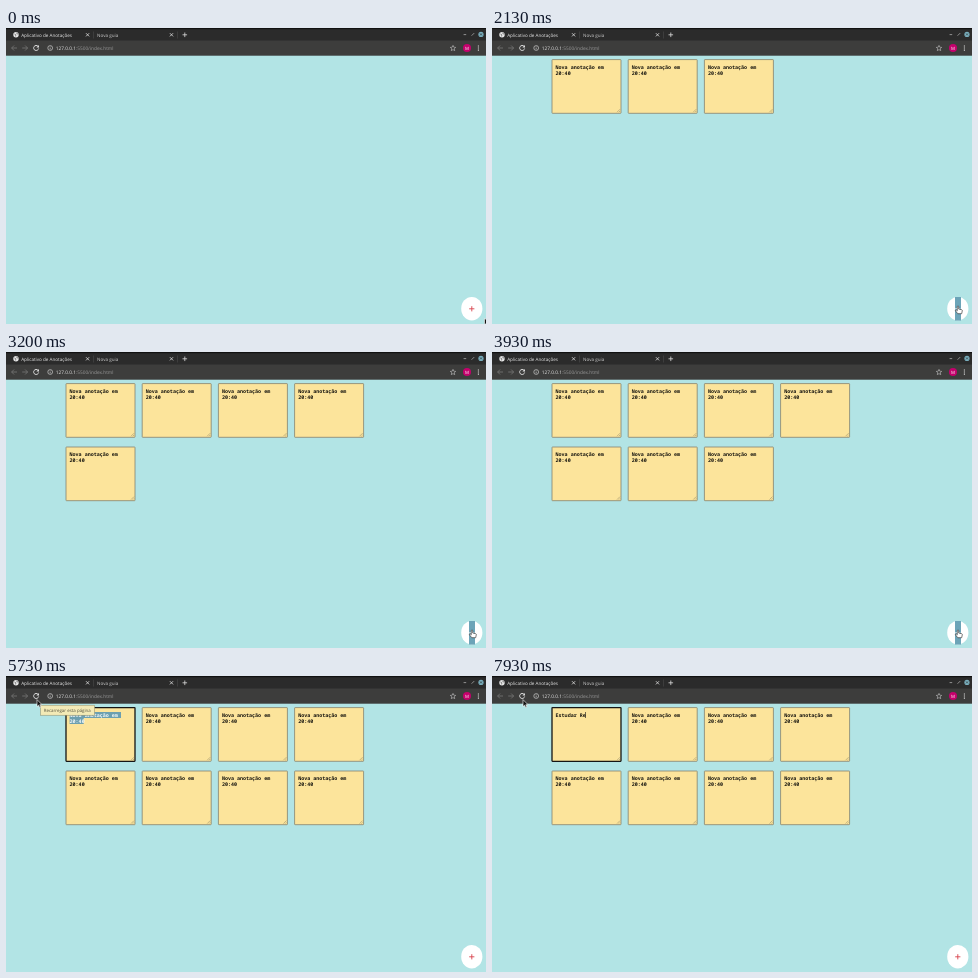
Recreate the animation shown at these times as an HTML page. Size 480 px wide and 296 px high, loop 8 s.

```html
<!DOCTYPE html>
<html lang="pt">
<head>
<meta charset="utf-8">
<title>Aplicativo de Anotações</title>
<style>
  html, body { margin: 0; width: 100%; height: 100%; overflow: hidden; background: #b2e4e5; }
  svg { display: block; width: 480px; height: 296px; }
  text { font: 4.6px "Open Sans", "Noto Sans", sans-serif; fill: #e8e8e8; text-rendering: geometricPrecision; }
  .line { fill: none; stroke: #ddd; stroke-width: .8; }
  .dim { stroke: #777; }
  .note text { font: bold 5.03px "Noto Sans Mono", "DejaVu Sans Mono", monospace; fill: #17150f; }
  .note .sheet { fill: #fce49b; stroke: #85826f; stroke-width: .8; }
  .note .grip { fill: none; stroke: #8d8566; stroke-width: .5; }
</style>
</head>
<body>
<svg viewBox="0 0 480 296">
  <rect width="480" height="296" fill="#b2e4e5"/>

  <!-- browser bars -->
  <rect width="480" height="13" fill="#2b2b2b"/>
  <rect width="480" height="1.2" fill="#111"/>
  <rect y="12.5" width="480" height="15.2" fill="#3d3d3c"/>
  <path d="M87.5 3.5v7M171.5 3.5v7" class="line" style="stroke:#4a4a4a;stroke-width:.6"/>
  <circle cx="10" cy="6.8" r="2.7" fill="#e6e6e6"/>
  <path d="M8.4 6l1.5.8-.4 1.6M10.4 4.6l.6 1.2 1.2.2" class="line" style="stroke:#444;stroke-width:.6"/>
  <text x="15.2" y="8.5">Aplicativo de Anotações</text>
  <text x="91" y="8.5" style="fill:#ccc">Nova guia</text>
  <path d="M80 5.2l3.2 3.2m0-3.2l-3.2 3.2M163.9 5.2l3.2 3.2m0-3.2l-3.2 3.2M176.5 6.8h4.6M178.8 4.5v4.6" class="line"/>
  <path d="M457.6 6.6h2.6M465.6 7.7l2.6-2.6" class="line" style="stroke:#aaa"/>
  <circle cx="475" cy="6.4" r="2.6" fill="#78aebd"/>
  <path d="M474 5.4l2 2m0-2l-2 2" class="line" style="stroke:#2b2b2b;stroke-width:.6"/>
  <path d="M11 20H5.6m2.5-2.5L5.6 20l2.5 2.5M16.2 20h5.4m-2.5-2.5l2.5 2.5-2.5 2.5" class="line dim"/>
  <path d="M32 18.3a2.5 2.5 0 1 0 .6 2.2" class="line" style="stroke-width:1"/>
  <path d="M33 17v2.6h-2.6z" fill="#ddd"/>
  <circle cx="44.2" cy="20" r="2.4" class="line" style="stroke-width:.6"/>
  <path d="M44.2 18.6v.6m0 .5v1.7" class="line" style="stroke-width:.6"/>
  <text x="49.8" y="21.8" style="font-size:4.78px">127.0.0.1<tspan fill="#999">:5500/index.html</tspan></text>
  <path d="M447 17.4l.8 1.8 1.9.2-1.4 1.3.4 1.9-1.7-1-1.7 1 .4-1.9-1.4-1.3 1.9-.2z" class="line" style="stroke-width:.5"/>
  <circle cx="461" cy="19.9" r="4" fill="#c4006c"/>
  <text x="461" y="21.5" text-anchor="middle" style="font-size:4.4px;fill:#fff">M</text>
  <path d="M472.4 17.4v1.1m0 1v1.1m0 1v1.1" class="line" style="stroke-width:1.1"/>

  <g id="notes"></g>

  <!-- add button -->
  <ellipse cx="465.8" cy="280.7" rx="10.6" ry="11.8" fill="#fff"/>
  <rect id="band" x="463" y="269" width="6" height="23.6" fill="#6ca4b8"/>
  <path id="plus" d="M463.2 280.8h5.2M465.8 278.2v5.2" stroke-width=".9"/>

  <g id="tip">
    <rect x="34.6" y="29.2" width="54" height="10" fill="#f3eab6" stroke="#8b8662" stroke-width=".5"/>
    <text x="37.8" y="35.9" style="font-size:4.4px;fill:#55523f">Recarregar esta página</text>
  </g>

  <g id="cursor">
    <path id="arrow" d="M0 0v7l1.6-1.4 1.1 2.4 1.2-.5-1.1-2.4h2.2z" fill="#111" stroke="#fff" stroke-width=".6"/>
    <path id="hand" d="M-.7-1.6q.8-.8 1.4 0v2.6l3 .7q.7.3.6 1l-.6 3h-3.9l-2.4-3q0-1 1-.7l.9.8z" fill="#fff" stroke="#222" stroke-width=".6"/>
    <path id="beam" d="M-1.3-3h2.6M0-3v6M-1.3 3h2.6" fill="none" stroke="#222" stroke-width=".7"/>
  </g>
</svg>
<script>
const LOOP = 8000;
const CHAR = 3.02, TEXT_X = 63.6;
const el = id => document.getElementById(id);
const show = (node, on) => node.style.display = on ? '' : 'none';

// moment each note is added
const added = [530, 1330, 1670, 2270, 2670, 3330, 3670, 4130];
// moment each letter is typed
const typed = 'Estudar Re';
const keys = [6670, 6870, 7070, 7270, 7470, 7670, 7800, 7870, 7870, 7930];
// pointer: time, x, y
const path = [
  [0, 478.5, 290], [70, 478.5, 290], [130, 470, 290], [270, 470, 290], [330, 466, 280],
  [4200, 466, 280], [4800, 78, 45], [4930, 78, 45], [5130, 63, 38], [5200, 63, 38], [5430, 31, 23.6]
];

el('notes').innerHTML = added.map((_, i) => {
  const x = 60 + i % 4 * 76.2, y = i < 4 ? 31.6 : 95;
  const first = i ? '' : '<g id="sel" fill="#6d9fb0"><rect id="sel1" y="36" height="6"/><rect id="sel2" y="42" height="6"/></g>';
  return `<g class="note">
    <rect class="sheet" x="${x}" y="${y}" width="69" height="53.7" rx=".5"/>${first}
    <text x="${x + 3.6}" y="${y + 8.9}">Nova anotação em</text>
    <text x="${x + 3.6}" y="${y + 14.9}">20:40</text>
    <path class="grip" d="M${x + 65} ${y + 52.6}l3-3m-1.2 3l1.2-1.2"/></g>`;
}).join('') + '<path id="caret" stroke="#111" stroke-width=".6"/>';

const notes = [...document.querySelectorAll('.note')];
const sheet = notes[0].querySelector('.sheet');
const [line1, line2] = notes[0].querySelectorAll('text');

function pointer(t) {
  const n = path.findIndex(p => p[0] > t);
  if (n < 0) return path.at(-1).slice(1);
  const [t0, x0, y0] = path[n - 1], [t1, x1, y1] = path[n];
  const u = (t - t0) / (t1 - t0), e = u * u * (3 - 2 * u);
  return [x0 + (x1 - x0) * e, y0 + (y1 - y0) * e];
}

function select(id, from, end) {
  el(id).setAttribute('x', from);
  el(id).setAttribute('width', Math.max(0, end - from));
}

function draw(t) {
  notes.forEach((note, i) => show(note, t >= added[i]));

  const [x, y] = pointer(t);
  const hover = t >= 300 && t < 4290;
  const inNote = t > 4500 && x > 60 && x < 129 && y > 31 && y < 86;
  el('cursor').setAttribute('transform', `translate(${x} ${y})`);
  show(el('hand'), hover);
  show(el('beam'), inNote);
  show(el('arrow'), !hover && !inNote);
  show(el('band'), hover);
  el('plus').setAttribute('stroke', hover ? '#fff' : '#d8424c');

  const focus = t >= 4800;
  sheet.style.stroke = focus ? '#151515' : '';
  sheet.style.strokeWidth = focus ? 1.3 : '';

  // dragging backwards from the end of the text selects it
  const count = keys.filter(k => k <= t).length;
  const drag = t >= 4930 && !count;
  const upper = drag && (y < 41.5 || t > 5130);
  const from = t > 5130 ? TEXT_X : Math.max(TEXT_X, x);
  show(el('sel'), drag);
  select('sel1', upper ? from : 115, 115);
  select('sel2', upper ? TEXT_X : from, TEXT_X + 5 * CHAR - 1);
  line1.style.fill = upper ? '#f4f8f8' : '';
  line2.style.fill = drag ? '#f4f8f8' : '';

  line1.textContent = count ? typed.slice(0, count) : 'Nova anotação em';
  line2.textContent = count ? '' : '20:40';
  el('caret').setAttribute('d', `M${TEXT_X + count * CHAR - .3} 36v6`);
  show(el('caret'), count > 0);
  show(el('tip'), t >= 5600 && !count);
}

function frame() {
  draw(performance.now() % LOOP);
  requestAnimationFrame(frame);
}
frame();
</script>
</body>
</html>
```
